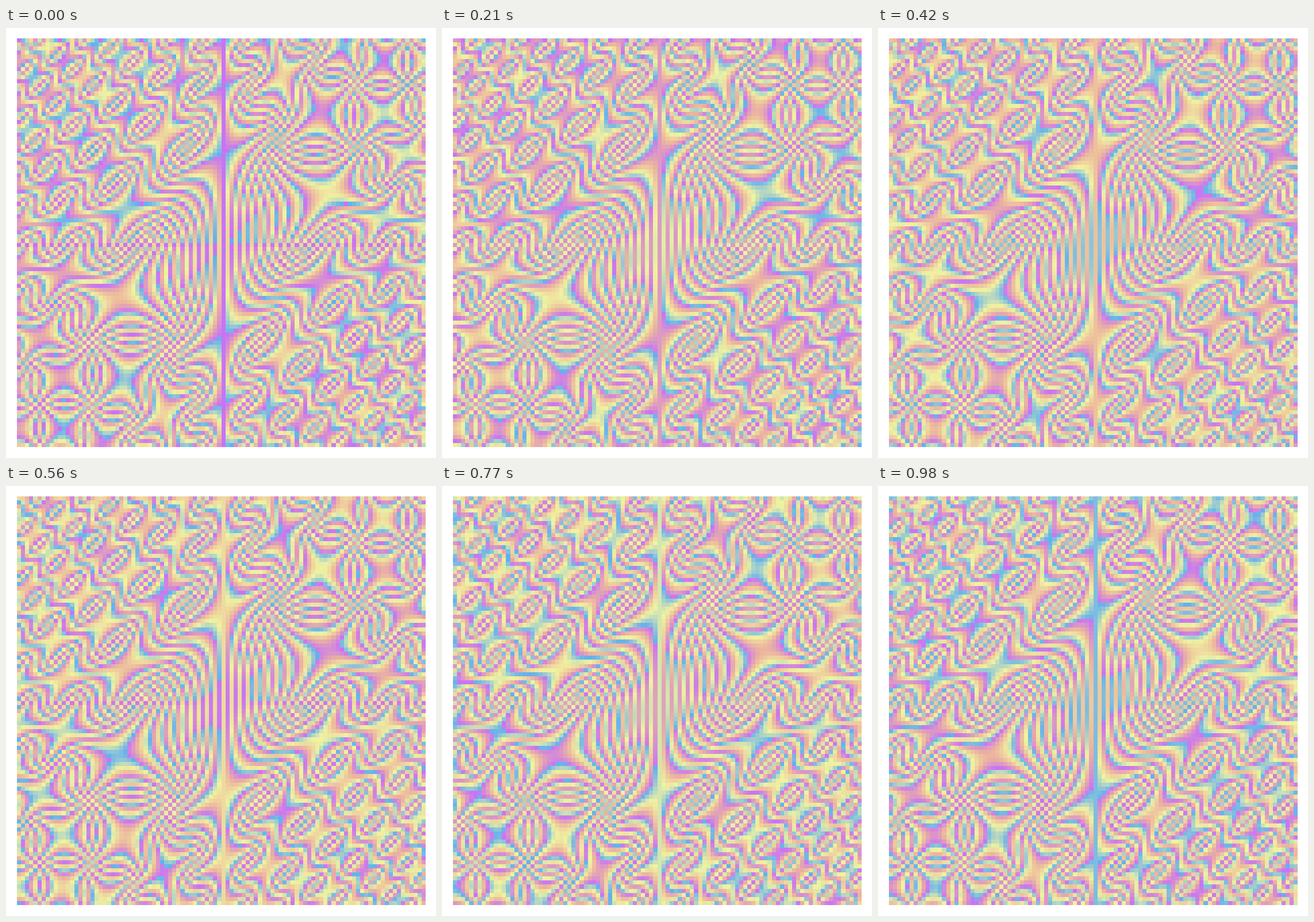
An HTML page with a canvas that plays this animation: 748 by 748 pixels, repeating every 1050 ms.

```html
<!DOCTYPE html>
<html lang="en">
<head>
<meta charset="utf-8">
<title>Cubic phase field</title>
<style>
  html, body { margin: 0; height: 100%; overflow: hidden; background: #fff; }
  canvas { display: block; }
</style>
</head>
<body>
<canvas id="stage" width="748" height="748"></canvas>
<script>
  const CELLS = 100, HALF = CELLS / 2, MOD = 1000;
  const STEPS = 15, STEP_MS = 70;
  const LEFT = 19, TOP = 18, SIZE = 711;
  const STOPS = [[199, 116, 245], [236, 181, 158], [240, 243, 160], [98, 176, 240]];

  const ctx = document.getElementById('stage').getContext('2d');
  const grid = document.createElement('canvas');
  grid.width = grid.height = CELLS;
  const gridCtx = grid.getContext('2d');
  const image = gridCtx.createImageData(CELLS, CELLS);

  const wrap = (v, n) => ((v % n) + n) % n;

  // Phase in [0, 1) to colour; the ramp jumps back at the end.
  function ramp(p) {
    const s = p * (STOPS.length - 1), k = Math.floor(s);
    return STOPS[k].map((c, i) => c + (STOPS[k + 1][i] - c) * (s - k));
  }

  function field(x, y) {
    return wrap(x * y * (x + y) + MOD / 2 * x, MOD) / MOD;
  }

  function draw(step) {
    let o = 0;
    for (let y = -HALF; y < HALF; y++) {
      for (let x = -HALF; x < HALF; x++) {
        const [r, g, b] = ramp((field(x, y) + step / STEPS) % 1);
        image.data[o++] = r;
        image.data[o++] = g;
        image.data[o++] = b;
        image.data[o++] = 255;
      }
    }
    gridCtx.putImageData(image, 0, 0);
    ctx.fillStyle = '#fff';
    ctx.fillRect(0, 0, 748, 748);
    ctx.imageSmoothingEnabled = false;
    ctx.drawImage(grid, LEFT, TOP, SIZE, SIZE);
  }

  const start = performance.now();
  let shown = -1;
  function tick() {
    const step = Math.floor((performance.now() - start) / STEP_MS) % STEPS;
    if (step !== shown) draw(shown = step);
    requestAnimationFrame(tick);
  }
  tick();
</script>
</body>
</html>
```
